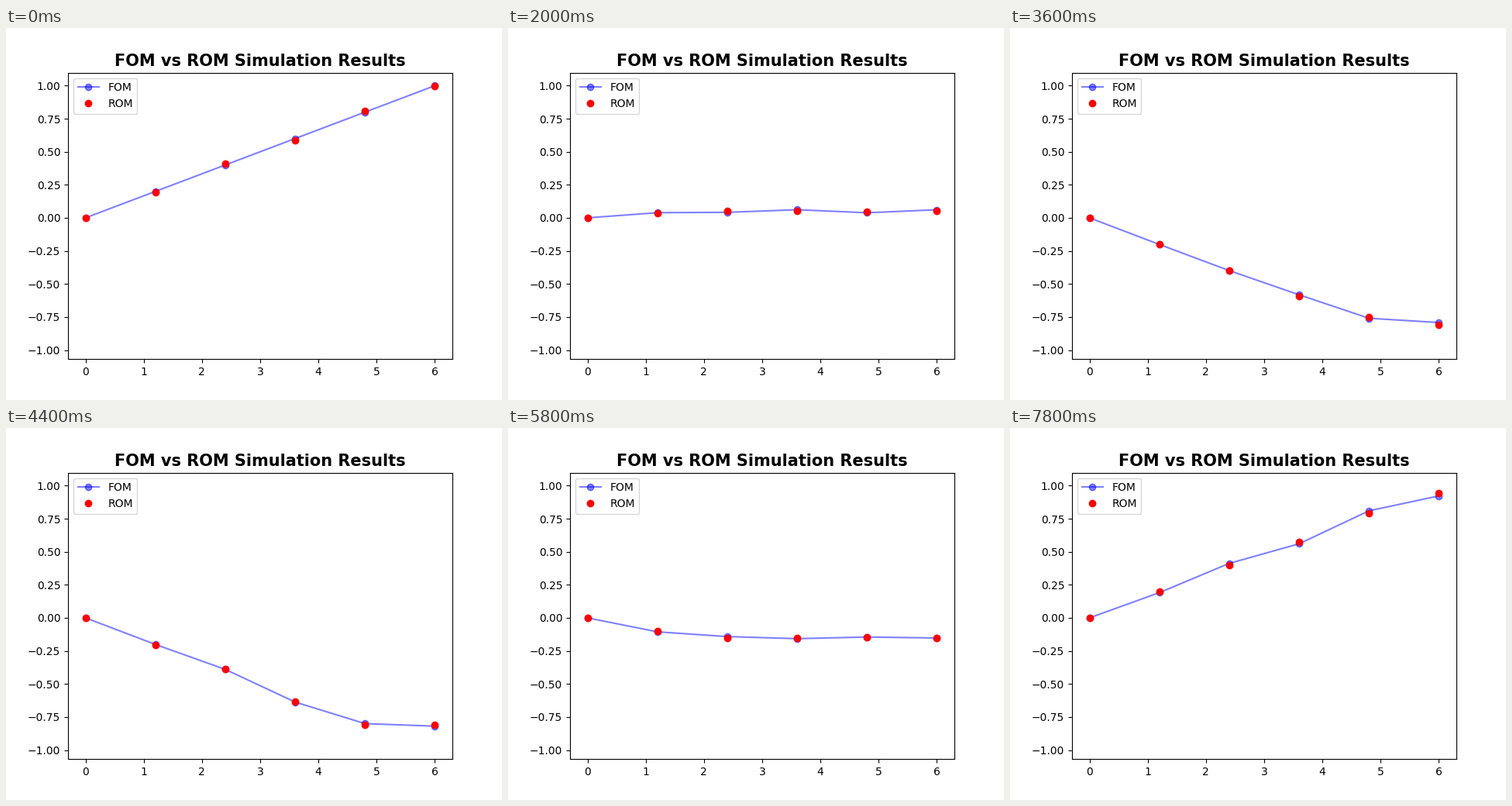
A matplotlib script for the animation above (8 s loop, 640x480 px).

```python
import numpy as np
import matplotlib.pyplot as plt
from matplotlib.animation import FuncAnimation

ELEMENTS, LENGTH, STEPS, DT = 5, 6.0, 40, 0.5
RANK = 4


def bar_matrices(n):
    """Consistent mass and stiffness of a fixed-free bar, unit elements."""
    off = np.eye(n, k=1) + np.eye(n, k=-1)
    mass = (4 * np.eye(n) + off) / 6
    stiff = 2 * np.eye(n) - off
    mass[-1, -1] /= 2
    stiff[-1, -1] /= 2
    return mass, stiff


def newmark(mass, stiff, u):
    """Average acceleration scheme, starting with zero velocity and acceleration."""
    v, a = np.zeros_like(u), np.zeros_like(u)
    lhs = mass + DT**2 / 4 * stiff
    states = [u]
    for _ in range(STEPS - 1):
        u_pred = u + DT * v + DT**2 / 4 * a
        v_pred = v + DT / 2 * a
        a = np.linalg.solve(lhs, -stiff @ u_pred)
        u = u_pred + DT**2 / 4 * a
        v = v_pred + DT / 2 * a
        states.append(u)
    return np.array(states)


def with_support(states):
    return np.hstack([np.zeros((STEPS, 1)), states])


x = np.linspace(0, LENGTH, ELEMENTS + 1)
M, K = bar_matrices(ELEMENTS)
u0 = x[1:] / LENGTH
full = newmark(M, K, u0)

# Galerkin projection onto the leading POD modes
V = np.linalg.svd(full.T, full_matrices=False)[0][:, :RANK]
reduced = newmark(V.T @ M @ V, V.T @ K @ V, V.T @ u0) @ V.T

fom, rom = with_support(full), with_support(reduced)

plt.rcParams["font.family"] = "DejaVu Sans"
fig, ax = plt.subplots(figsize=(6.4, 4.8), dpi=100)
fom_line, = ax.plot(x, fom[0], "b-o", alpha=0.5, label="FOM")
rom_line, = ax.plot(x, rom[0], "ro", label="ROM")

low = min(fom.min(), rom.min())
high = max(fom.max(), rom.max())
margin = 0.05 * (high - low)
ax.set_xlim(-0.05 * LENGTH, 1.05 * LENGTH)
ax.set_ylim(low - margin, high + margin)
ax.set_title("FOM vs ROM Simulation Results", fontsize=15, fontweight="bold")
ax.legend(loc="upper left")


def update(i):
    fom_line.set_ydata(fom[i])
    rom_line.set_ydata(rom[i])
    return fom_line, rom_line


anim = FuncAnimation(fig, update, frames=STEPS, interval=200, repeat=True,
                     repeat_delay=0, blit=False)
plt.show()
```
